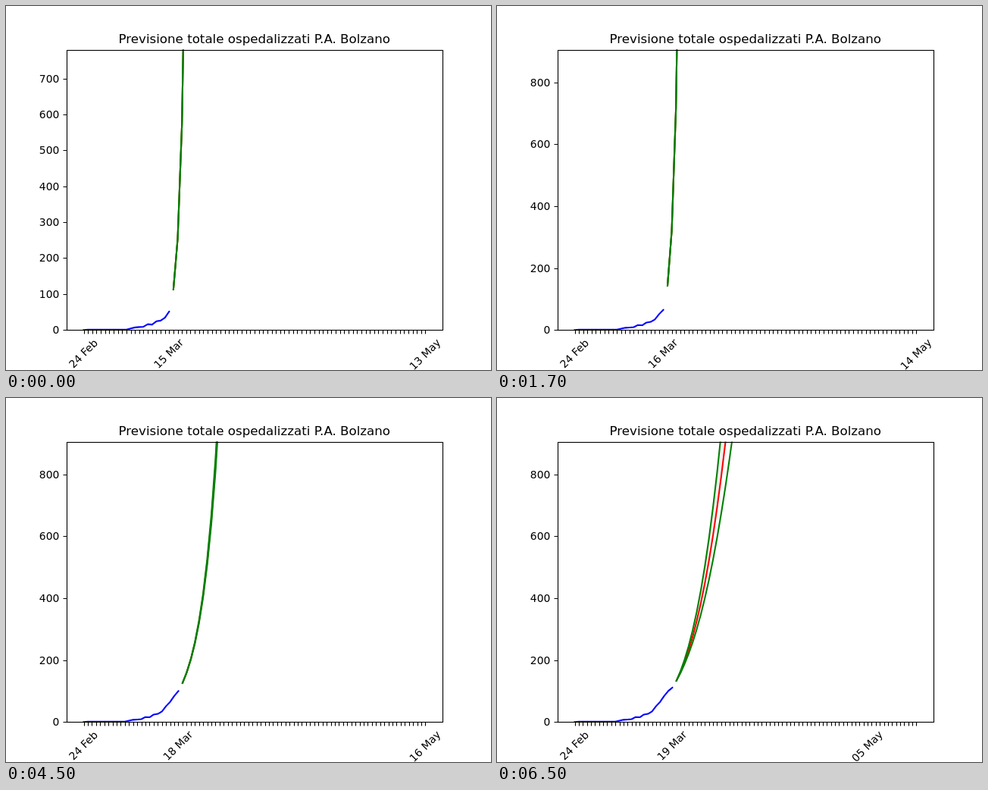
Write an HTML page that moves like this. It is 640 by 480 pixels and loops after 8000 ms.

```html
<!DOCTYPE html>
<html lang="it">
<head>
<meta charset="utf-8">
<title>Previsione</title>
<style>
  html, body { margin: 0; width: 100%; height: 100%; overflow: hidden; background: #fff; }
  svg { display: block; width: 640px; height: 480px; font: 13.889px "DejaVu Sans", sans-serif; }
  .title { font-size: 16.667px; }
  .axis { fill: none; stroke: #000; stroke-width: 1.11; }
  .line { fill: none; stroke-width: 2.083; stroke-linecap: square; stroke-linejoin: round; }
  .day { visibility: hidden; }
  .day.on { visibility: visible; }
</style>
</head>
<body>
<svg id="chart" viewBox="0 0 640 480">
  <clipPath id="plot"><rect x="80" y="57.6" width="496" height="369.6"/></clipPath>
  <text class="title" x="327.8" y="49" text-anchor="middle">Previsione totale ospedalizzati P.A. Bolzano</text>
</svg>
<script>
const LOOP = 8000;
const LEFT = 102.545, SPAN = 450.91, BASE = 427.2, HEIGHT = 369.6;
const history = [0, ...Array(10).fill(1), 4, 7, 8, 9, 16, 15, 24, 26, 34, 51, 65, 84, 100, 111];

// Each forecast curve is first * exp(a*i - b*i*i).
const days = [
  { at: 0, last: 20, max: 780, step: 100, first: 113, mid: [0.811, 0], end: ['13 May', 80] },
  { at: 500, last: 21, max: 906, step: 200, first: 143, mid: [0.806, 0], end: ['14 May', 81] },
  { at: 2500, last: 22, max: 906, step: 200, first: 184, mid: [0.797, 0], end: ['15 May', 82] },
  { at: 4500, last: 23, max: 906, step: 200, first: 126, mid: [0.2352, 0],
    high: [0.2385, 0], low: [0.2322, 0], end: ['16 May', 83] },
  { at: 6500, last: 24, max: 906, step: 200, first: 133, mid: [0.194, 0.0029],
    high: [0.2136, 0.00334], low: [0.1754, 0.00255], end: ['05 May', 72], shade: true }
];

const chart = document.getElementById('chart');

function add(parent, tag, attrs, text) {
  const el = document.createElementNS('http://www.w3.org/2000/svg', tag);
  for (const key in attrs) el.setAttribute(key, attrs[key]);
  if (text !== undefined) el.textContent = text;
  parent.appendChild(el);
  return el;
}

function dateLabel(parent, text, x) {
  const y = text.endsWith('May') ? 459.9 : 458.9;
  add(parent, 'text', {
    transform: `translate(${x} ${y}) rotate(-45)`, y: 4, 'text-anchor': 'middle'
  }, text);
}

function drawDay(day) {
  const group = add(chart, 'g', { class: 'day' });
  const lines = add(group, 'g', { 'clip-path': 'url(#plot)' });
  const count = 60 + day.last;
  const px = i => LEFT + i * SPAN / count;
  const py = v => BASE - v * HEIGHT / day.max;
  const point = (i, v) => `${px(i).toFixed(2)},${py(v).toFixed(2)}`;

  const curve = ([a, b]) => {
    const points = [];
    for (let i = 0, v = 0; v < day.max * 1.15 && i < 25; i++) {
      v = day.first * Math.exp(a * i - b * i * i);
      points.push(point(day.last + 1 + i, v));
    }
    return points;
  };
  const line = (points, stroke) =>
    add(lines, 'polyline', { class: 'line', points: points.join(' '), stroke });

  const mid = curve(day.mid);
  const high = curve(day.high || day.mid);
  const low = curve(day.low || day.mid);
  if (day.shade) {
    add(lines, 'polygon', { points: [...high, ...mid.slice().reverse()].join(' '), fill: '#f0f0f0' });
  }
  line(history.slice(0, day.last + 1).map((v, i) => point(i, v)), '#00f');
  line(mid, '#f00');
  line(high, '#008000');
  line(low, '#008000');

  let ticks = '';
  for (let i = 0; i <= count; i++) ticks += `M${Math.round(px(i)) + 0.5} 427.5v5`;
  for (let v = 0; v < day.max; v += day.step) {
    const y = Math.round(py(v)) + 0.5;
    ticks += `M80.5 ${y}h-5`;
    add(group, 'text', { x: 70.3, y: y + 4.8, 'text-anchor': 'end' }, v);
  }
  add(group, 'path', { class: 'axis', d: ticks });

  dateLabel(group, '24 Feb', px(0));
  dateLabel(group, `${day.last - 5} Mar`, px(day.last));
  dateLabel(group, day.end[0], px(day.end[1]));
  return group;
}

const groups = days.map(drawDay);
add(chart, 'rect', { class: 'axis', x: 80.5, y: 58.5, width: 496, height: 369 });

const start = performance.now();
function tick() {
  const t = Math.max(0, performance.now() - start) % LOOP;
  const current = days.filter(day => day.at <= t).length - 1;
  groups.forEach((group, i) => group.classList.toggle('on', i === current));
  requestAnimationFrame(tick);
}
tick();
</script>
</body>
</html>
```
